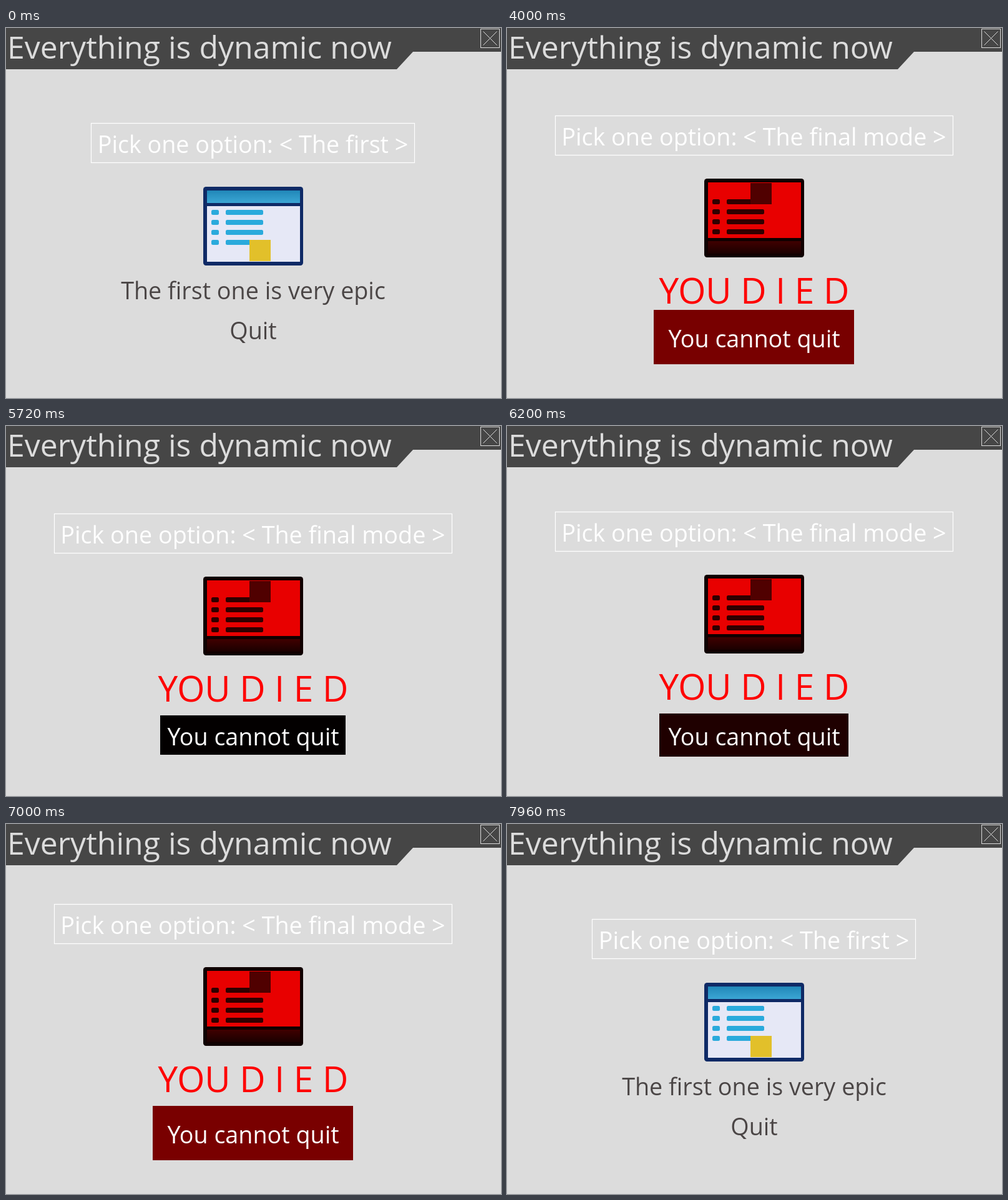
Recreate the animation shown at these times as an HTML page. Size 793 by 592 pixels, loop 9800 ms.

```html
<!DOCTYPE html>
<html lang="en">
<head>
<meta charset="utf-8">
<title>Dynamic menu</title>
<style>
  html, body { margin: 0; width: 100%; height: 100%; overflow: hidden; background: #dcdcdc; }
  svg { display: block; width: 793px; height: 592px; }
  text {
    font-family: "Open Sans", "Noto Sans", sans-serif;
    font-size: 37.7px;
    font-variant-ligatures: none;
    text-anchor: middle;
    white-space: pre;
  }
</style>
</head>
<body>
<svg viewBox="0 0 793 592" xmlns="http://www.w3.org/2000/svg">
  <defs>
    <linearGradient id="shade" x1="0" y1="0" x2="0" y2="1">
      <stop id="shadeTop" offset="0"/>
      <stop id="shadeEnd" offset="1"/>
    </linearGradient>
  </defs>
  <rect width="793" height="592" fill="#dcdcdc"/>

  <path d="M0 0H793V38H652L626 66H0Z" fill="#464646"/>
  <text x="2" y="49" fill="#dcdcdc" style="font-size:49.9px;text-anchor:start">Everything is dynamic now</text>
  <g fill="none" stroke="#dcdcdc">
    <rect x="760.5" y="1.5" width="30" height="30"/>
    <path d="M764.5 5.5L786.5 27.5M786.5 5.5L764.5 27.5"/>
  </g>

  <rect id="frame" height="63" fill="none" stroke="#fff" stroke-width="1.2"/>
  <text id="picker" x="395.5" fill="#fff"></text>

  <g id="icon">
    <rect id="border" width="160" height="126" rx="4.5"/>
    <rect x="6" y="6" width="149" height="20" fill="url(#shade)"/>
    <rect id="page" x="6" y="31" width="149" height="89"/>
    <g id="rows"></g>
    <rect id="badge" x="74" y="85" width="34" height="34"/>
  </g>

  <text id="label" x="396"></text>
  <rect id="plate"/>
  <text id="quit" x="396"></text>
</svg>

<script>
const LOOP = 9800, STEP = 40;
const $ = id => document.getElementById(id);
const set = (id, attrs) => {
  for (const key in attrs) $(id).setAttribute(key, attrs[key]);
};

const modes = {
  first: {
    option: "The first", left: 136.5, width: 518, top: 152.5,
    label: "The first one is very epic", size: 37.7, ink: "#4b4646", labelY: 434,
    quit: "Quit", quitInk: "#4b4646", quitY: 498,
    border: "#0f2a66", shade: ["#2187b8", "#3ba6d4"], page: "#e6e8f6",
    row: "#2aaadc", badge: "#e2c02a"
  },
  second: {
    option: "The second", left: 108.5, width: 573.5, top: 161.5,
    label: "This other one is also epic, but fancy", size: 24.9, ink: "#0a0a0a", labelY: 428,
    quit: "Quit", quitInk: "#4b4646", quitY: 490,
    border: "#2d2b2c", shade: ["#6e6a6d", "#918d90"], page: "#ebebec",
    row: "#948f92", badge: "#8c8a8b"
  },
  final: {
    option: "The final mode", left: 77.5, width: 637, top: 140.5,
    label: "YOU D I E D", size: 56.7, ink: "#ff0000", labelY: 441,
    quit: "You cannot quit", quitInk: "#fff", quitY: 511,
    border: "#100000", shade: ["#1a0000", "#400000"], page: "#e80000",
    row: "#300000", badge: "#500000", flip: true
  }
};

const bar = (x, y, w) => `<rect x="${x}" y="${y}" width="${w}" height="8" rx="2.5"/>`;
$("rows").innerHTML = [0, 1, 2, 3]
  .map(i => bar(13, 37 + 16 * i, 12) + bar(36, 37 + 16 * i, 60))
  .join("");

function draw(time) {
  const t = Math.floor((time % LOOP) / STEP) * STEP;
  const name = t < 1080 || t >= 7960 ? "first" : t < 4000 ? "second" : "final";
  const m = modes[name];

  // The button's padding and red swing together.
  const swing = 1 - Math.sin(0.04 + 1.025 * (t - 4000) / 1000);
  const pad = m.flip ? Math.floor(12.5 * swing) : 0;
  // The layout follows the padding one step later.
  const lift = t >= 4000 + STEP ? pad : 0;
  const top = m.top - lift;

  set("frame", { x: m.left, y: top, width: m.width });
  set("picker", { y: top + 47.5 });
  $("picker").textContent = `Pick one option: < ${m.option} >`;

  const iconY = top + 101;
  set("icon", {
    transform: m.flip
      ? `translate(316 ${iconY + 125.5}) scale(1 -1)`
      : `translate(316 ${iconY + 0.5})`
  });
  for (const part of ["border", "page", "badge"]) set(part, { fill: m[part] });
  set("rows", { fill: m.row });
  set("shadeTop", { "stop-color": m.shade[0] });
  set("shadeEnd", { "stop-color": m.shade[1] });

  set("label", { y: m.labelY - lift, fill: m.ink });
  $("label").style.fontSize = m.size + "px";
  $("label").textContent = m.label;

  set("plate", {
    x: 247 - pad, y: 463 - pad, width: 297 + 2 * pad, height: 63 + 2 * pad,
    fill: `rgb(${Math.floor(125 * swing)},0,0)`,
    visibility: m.flip ? "visible" : "hidden"
  });
  set("quit", { y: m.quitY, fill: m.quitInk });
  $("quit").textContent = m.quit;
}

const start = performance.now();
function tick() {
  draw(performance.now() - start);
  requestAnimationFrame(tick);
}
tick();
</script>
</body>
</html>
```
